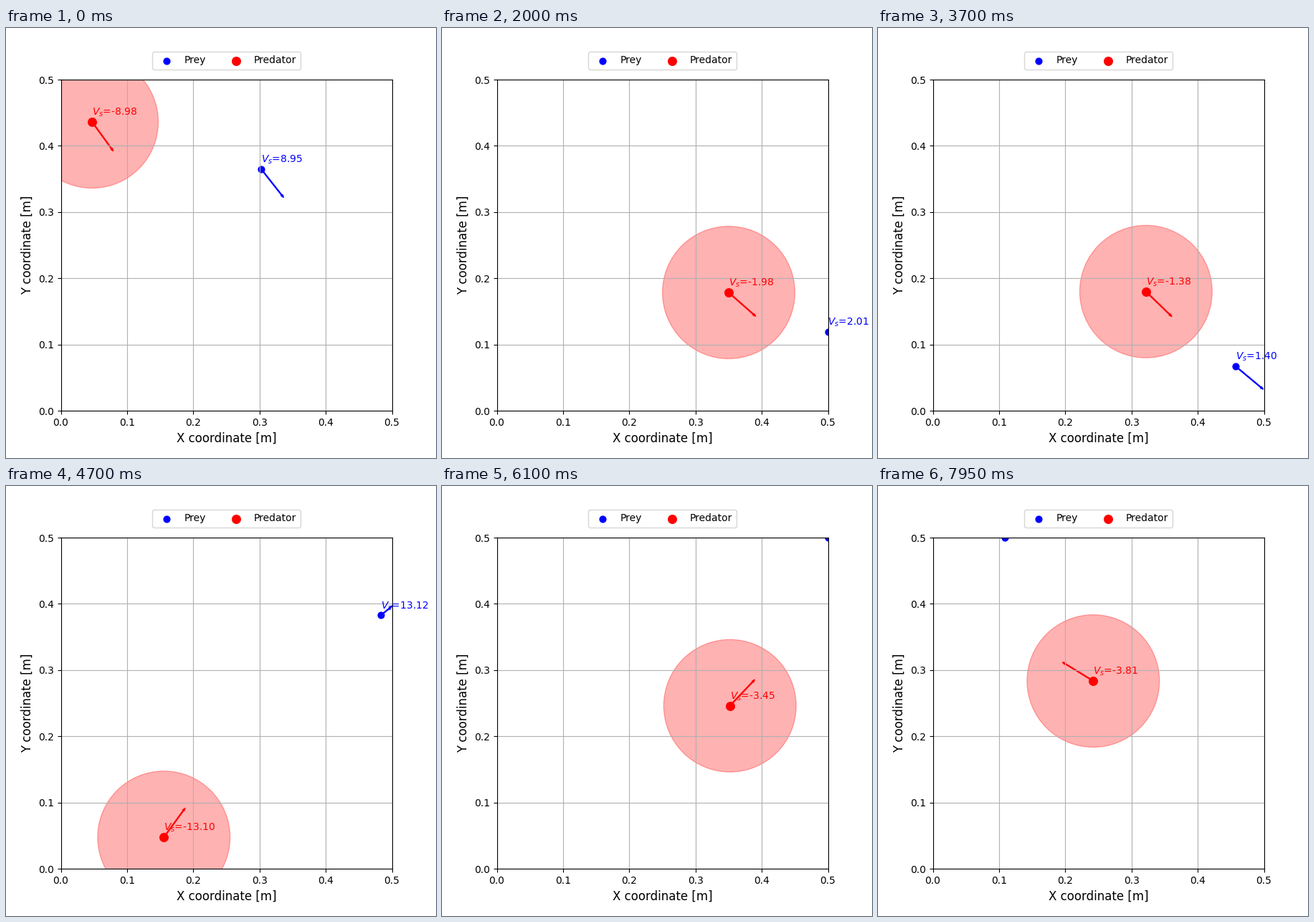
Write a matplotlib script that moves like this. It is 600x600 px and loops after 8000 ms.

```python
import numpy as np
import matplotlib.pyplot as plt
from matplotlib.animation import FuncAnimation

FRAMES, INTERVAL = 160, 50
SIDE = 0.5      # arena side
STEP = 0.01     # distance moved per frame
REACH = 0.1     # radius of the predator's disc
ARROW = 0.05

# Each chase: the predator's key headings (frame, degrees), the prey's heading
# relative to it, and per agent a start point and a state value (first, drop per frame).
CHASES = [
    dict(turns=[(0, -54), (25, -31.5), (47, -46)], lead=2.3,
         predator=((0.0472, 0.4361), (8.98, 0.175)),
         prey=((0.3027, 0.3647), (8.95, 0.1736))),
    dict(turns=[(48, -91), (60, -62), (74, -44), (89, -46)], lead=4.2,
         predator=((0.2102, 0.4067), (5.959, 0.1761)),
         prey=((0.3292, 0.2852), (5.95, 0.175))),
    dict(turns=[(90, 57), (110, 41.5), (119, 41.5), (130, 60), (141, 68)], lead=-15,
         predator=((0.1329, 0.0145), (14.478, 0.3446)),
         prey=((0.4528, 0.3568), (14.5, 0.345))),
    dict(turns=[(142, 154.5), (159, 148.5)], lead=10,
         predator=((0.3916, 0.2024), (6.79, 0.1753)),
         prey=((0.2700, 0.4654), (6.79, 0.1753))),
]


def direction(chase, frames, lead):
    angle = np.radians(np.interp(frames, *zip(*chase["turns"])) + lead)
    return np.array([np.cos(angle), np.sin(angle)])


fig, ax = plt.subplots(figsize=(6, 6), dpi=100)
ax.set_aspect("equal")
ax.set_xlim(0, SIDE)
ax.set_ylim(0, SIDE)
ax.set_xlabel("X coordinate [m]", fontsize=12)
ax.set_ylabel("Y coordinate [m]", fontsize=12)
ax.grid(True)


class Agent:
    def __init__(self, name, color, size, sign):
        self.key, self.sign = name.lower(), sign
        self.dot = ax.scatter([0], [0], s=size, color=color, label=name)
        self.arrow = ax.arrow(0, 0, ARROW, 0, color=color)
        self.note = ax.annotate("", (0, 0), color=color)

    def place(self, chase, k):
        start, (first, drop) = chase[self.key]
        lead = chase["lead"] if self.key == "prey" else 0
        begin = chase["turns"][0][0]

        # constant speed along the heading; the walls hold the agent inside
        steps = direction(chase, np.arange(begin, k) + 0.5, lead)
        x, y = np.clip(start + STEP * steps.sum(axis=1), 0, SIDE)
        dx, dy = ARROW * direction(chase, k, lead)
        value = self.sign * max(0.3, first - drop * (k - begin))

        self.dot.set_offsets([(x, y)])
        self.arrow.set_data(x=x, y=y, dx=dx, dy=dy)
        self.note.xy = (x, y + 0.01)
        self.note.set_position(self.note.xy)
        self.note.set_text(f"$V_s$={value:.2f}")
        return x, y


prey = Agent("Prey", "blue", 40, 1)
predator = Agent("Predator", "red", 70, -1)
disc = ax.add_patch(plt.Circle((0, 0), REACH, color="red", alpha=0.3))
ax.legend(loc="upper center", bbox_to_anchor=(0.5, 1.1), ncol=2)


def update(k):
    chase = [c for c in CHASES if c["turns"][0][0] <= k][-1]
    prey.place(chase, k)
    disc.center = predator.place(chase, k)
    return []


anim = FuncAnimation(fig, update, frames=FRAMES, interval=INTERVAL,
                     repeat=True, repeat_delay=0)
plt.show()
```
